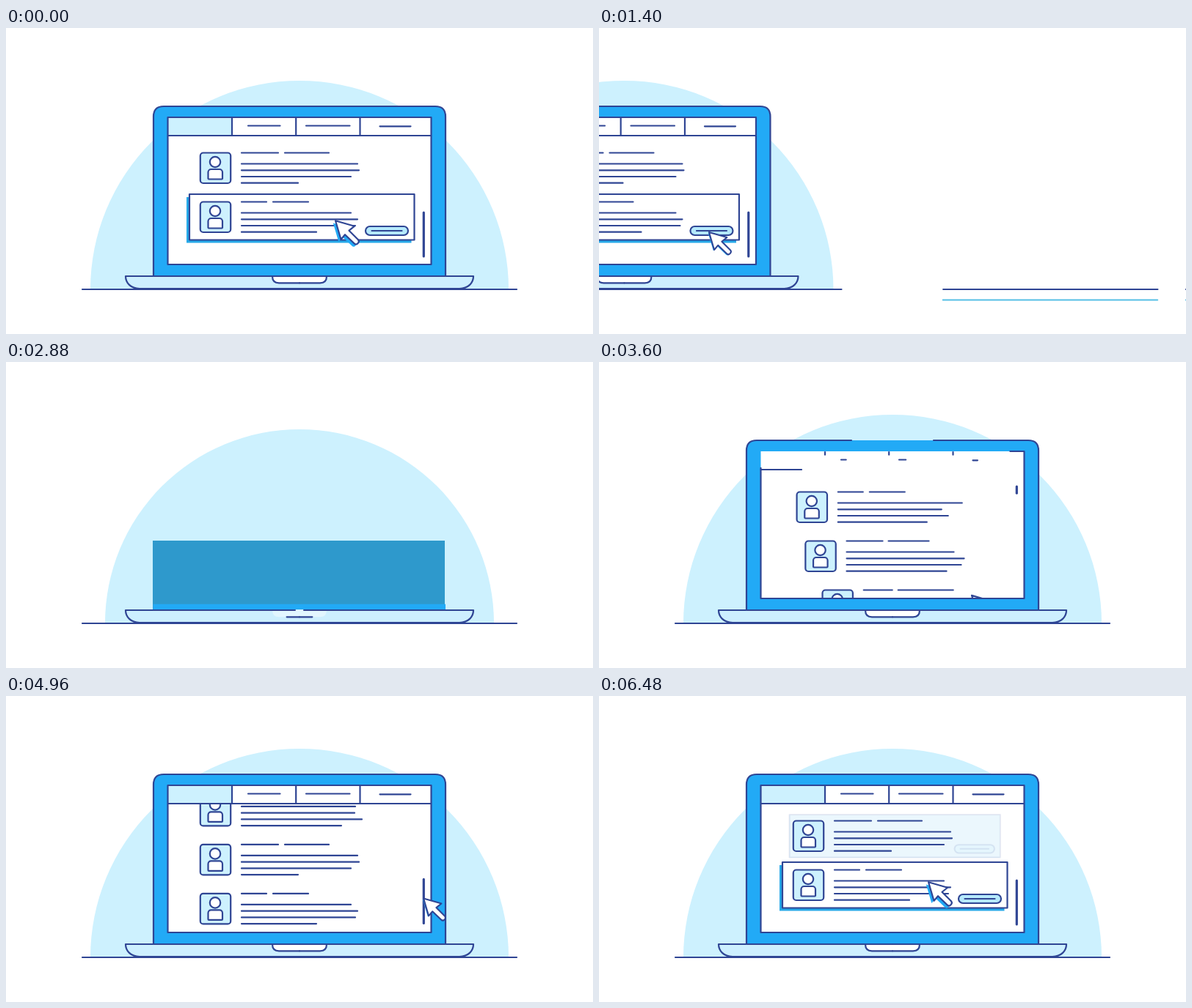
These frames come from a looping animation (800 px wide and 418 px high, 6.52 s). An HTML page with a canvas:

```html
<!DOCTYPE html>
<html lang="en">
<head>
<meta charset="utf-8">
<title>Laptop list</title>
<style>
html, body { margin: 0; width: 100%; height: 100%; overflow: hidden; background: #fff; }
canvas { display: block; }
</style>
</head>
<body>
<canvas id="stage" width="800" height="418"></canvas>
<script>
const LOOP = 6520;
const NAVY = '#2f4594', BLUE = '#22aaf6', LIGHT = '#cdf1fe', CYAN = '#55bfe5', DARK = '#2e99cc';
const ctx = document.getElementById('stage').getContext('2d');

const linear = p => p;
const outQuad = p => 1 - (1 - p) ** 2;
const outCubic = p => 1 - (1 - p) ** 3;
const inOutQuad = p => p < .5 ? 2 * p * p : 1 - 2 * (1 - p) ** 2;
const inOutCubic = p => p < .5 ? 4 * p ** 3 : 1 - 4 * (1 - p) ** 3;
const ramp = (t, from, to, ease = linear) => ease(Math.min(1, Math.max(0, (t - from) / (to - from))));
const mix = (a, b, p) => a + (b - a) * p;

function makePath(d) {
  const el = document.createElementNS('http://www.w3.org/2000/svg', 'path');
  el.setAttribute('d', d);
  return { shape: new Path2D(d), length: el.getTotalLength() };
}

const paths = {
  bodyL: makePath('M201 338V121Q201 107 215 107H400'),
  bodyR: makePath('M599 338V121Q599 107 585 107H400'),
  screenL: makePath('M421 323H220.5V122H379'),
  screenR: makePath('M421 323H579.5V122H379'),
  baseL: makePath('M400 356H182C170 356 163 348 163 339H400'),
  baseR: makePath('M400 356H618C630 356 637 348 637 339H400'),
  notchL: makePath('M400 348.3H372Q363 348.3 363 339'),
  notchR: makePath('M400 348.3H428Q437 348.3 437 339'),
  navy: makePath('M800 357H240C217 357 204.5 340 204.5 316L205.5 240C205.5 180 175 140 130 140C90 140 60 160 45 190'),
  cyan: makePath('M800 371.5H230C205 371.5 193 353 193 330V210C193 172 170 152 133 152C60 152 14 190 14 240')
};
const baseShape = new Path2D('M163 339H637C637 348 630 356 618 356H182C170 356 163 348 163 339Z');
const notchShape = new Path2D('M363 339H437Q437 348.3 428 348.3H372Q363 348.3 363 339Z');
const arrowShape = new Path2D('M0 0L26 7.5L18.5 13.5L31 26Q33 28.5 30.5 31Q28 33.5 25.5 31L13 19L7.5 25.5Z');

// Each card: the two heading spans, then the right ends of four lines.
const cards = [
  [57, 91, 100, 148, 226, 198, 207, 178],
  [57, 106, 114, 169, 203, 217, 213, 193],
  [57, 96, 104, 179, 210, 200, 214, 180],
  [57, 100, 109, 160, 212, 211, 221, 193],
  [57, 107, 116, 176, 215, 217, 206, 134],
  [57, 91, 100, 148, 206, 215, 212, 159]
];

// Start, end, target x, target y, easing.
const cursorStart = [502, 331];
const cursorMoves = [
  [3440, 4200, 569, 196, inOutQuad],
  [4380, 5080, 569, 278, inOutCubic],
  [5300, 5850, 449, 195, inOutCubic],
  [6309, 6698, 449, 281, outQuad],
  [6740, 7220, 515.5, 279, inOutCubic]
];

// Time, tail and head as distance along the path.
const trails = {
  navy: [[960, 121, 121], [1040, 41, 121], [1400, 38, 330], [1840, 280, 707], [2280, 1000, 1000]],
  cyan: [[960, 60, 60], [1040, 50, 102], [1400, 38, 330], [1840, 413, 870], [2280, 1100, 1100]]
};

function stroke(color = NAVY, width = 2.2) {
  ctx.strokeStyle = color;
  ctx.lineWidth = width;
}

function line(x1, y1, x2, y2, width = 2.2) {
  stroke(NAVY, width);
  ctx.beginPath();
  ctx.moveTo(x1, y1);
  ctx.lineTo(x2, y2);
  ctx.stroke();
}

function box(x, y, w, h, r, fill, outlined = true) {
  ctx.beginPath();
  ctx.roundRect(x, y, w, h, r);
  if (fill) {
    ctx.fillStyle = fill;
    ctx.fill();
  }
  if (outlined) {
    stroke();
    ctx.stroke();
  }
}

function segment(path, from, to, color = NAVY) {
  to = Math.min(to, path.length);
  if (to - from < .5) return;
  stroke(color);
  ctx.setLineDash([0, from, to - from, path.length + 10]);
  ctx.stroke(path.shape);
  ctx.setLineDash([]);
}

function pair(name, p) {
  for (const side of 'LR') {
    const path = paths[name + side];
    segment(path, 0, path.length * p);
  }
}

function clip(x, y, w, h) {
  ctx.beginPath();
  ctx.rect(x, y, w, h);
  ctx.clip();
}

function trailAt(keys, t) {
  const i = keys.findIndex(k => k[0] > t);
  if (i < 1) return null;
  const a = keys[i - 1], b = keys[i];
  const p = ramp(t, a[0], b[0]);
  return [mix(a[1], b[1], p), mix(a[2], b[2], p)];
}

function drawTrails(t) {
  for (const name of ['cyan', 'navy']) {
    const span = trailAt(trails[name], t);
    if (!span) continue;
    const [tail, head] = span;
    segment(paths[name], tail, head, name === 'cyan' ? CYAN : NAVY);
    if (name === 'navy') {
      const tint = 51 * (1 - ramp(t, 1040, 1400));
      segment(paths.navy, tail, Math.min(head, tail + tint), CYAN);
    }
  }
}

function drawCard(x, y, spec) {
  box(x + .8, y + .5, 41.4, 41.5, 4, LIGHT);
  ctx.beginPath();
  ctx.arc(x + 21, y + 13, 7.2, 0, Math.PI * 2);
  ctx.fillStyle = '#fff';
  ctx.fill();
  stroke();
  ctx.stroke();
  box(x + 11.5, y + 23, 19.5, 13.5, [4, 4, 1, 1], '#fff');
  line(x + spec[0], y + .5, x + spec[1], y + .5);
  line(x + spec[2], y + .5, x + spec[3], y + .5);
  [15.5, 24.3, 33, 41.7].forEach((dy, i) => line(x + 57, y + dy, x + spec[4 + i], y + dy));
}

function drawHover(y, show, press) {
  if (show <= 0) return;
  ctx.save();
  ctx.globalAlpha = show;
  ctx.translate(403, y + 21);
  ctx.scale(mix(.93, 1, show), mix(.93, 1, show));
  ctx.translate(-403, -y - 21);
  const shift = 4 * show;
  box(250 - shift, y - 10 + shift, 306.5, 62.5, 0, '#27a9e8', false);
  box(250, y - 10, 306.5, 62.5, 0, '#fff');
  ctx.translate(519, y + 40);
  ctx.scale(1 - .1 * press, 1 - .04 * press);
  box(-29, -6, 58, 12, 6, '#b5e9fc');
  line(-20.5, 0, 20.5, 0);
  ctx.restore();
}

function drawContent(u) {
  const scroll = 275 * ramp(u, 4426, 5200, inOutCubic);
  const grow = ramp(u, 3540, 3760, inOutQuad);
  const press = ramp(u, 7460, 7540) - ramp(u, 7580, 7680);
  const top = 177 - scroll;

  ctx.save();
  clip(221, u < 3700 ? 122 : 148, 358, u < 3700 ? 200 : 174);
  drawHover(top + 4 * 67, ramp(u, 5600, 5800, outCubic) - ramp(u, 6320, 6500), 0);
  drawHover(top + 5 * 67, ramp(u, 6280, 6460, outCubic), press);
  cards.forEach((spec, i) => {
    const start = 3369 + 40 * i;
    const dx = 300 * (1 - ramp(u, start, start + 310, outCubic));
    if (u > start) drawCard(264 + dx, top + 67 * i, spec);
  });
  ctx.restore();

  if (grow > 0) {
    ctx.globalAlpha = ramp(u, 3640, 3840);
    box(221, 122, 87, 25, 0, LIGHT, false);
    ctx.globalAlpha = 1;
    line(221, 147, 221 + 358 * grow, 147);
    for (const x of [308, 395.2, 482.5]) line(x, 123, x, 123 + 24 * grow);
    for (const [a, b, y] of [[330, 373.5, 133.5], [409, 468.5, 133.5], [509.5, 551.5, 134.3]])
      line(a, y, mix(a, b, grow), y);
    const barY = 170 + 82 * ramp(u, 4380, 5080, inOutCubic);
    line(569.3, barY, 569.3, barY + 60 * grow, 3.2);
  }
}

function drawCursor(u) {
  if (u < 3440) return;
  let [x, y] = cursorStart;
  for (const [from, to, tx, ty, ease] of cursorMoves) {
    const p = ramp(u, from, to, ease);
    x = mix(x, tx, p);
    y = mix(y, ty, p);
  }
  const down = ramp(u, 4220, 4340) - ramp(u, 5100, 5220) + ramp(u, 7440, 7520);
  ctx.save();
  if (u < 3760) clip(221, 122, 358, 200);
  ctx.translate(x, y);
  const size = 1 - .06 * down;
  ctx.scale(size, size);
  const shift = 3.2 * (1 - .6 * down);
  ctx.save();
  ctx.translate(-shift, shift);
  ctx.fillStyle = BLUE;
  ctx.fill(arrowShape);
  ctx.restore();
  ctx.fillStyle = '#fff';
  ctx.fill(arrowShape);
  stroke();
  ctx.stroke(arrowShape);
  ctx.restore();
}

function drawLaptop(u) {
  const dark = 231 * ramp(u, 2752, 3038, inOutQuad);
  const bright = 231 * ramp(u, 2845, 3131, inOutQuad);
  const corner = 14 * ramp(u, 3131, 3260);
  if (u < 3131) box(200, 338 - dark, 398, dark, 0, DARK, false);
  if (bright > 0) box(200.5, 338 - bright, 398.5, bright, [corner, corner, 0, 0], BLUE, false);
  const white = 201 * ramp(u, 3120, 3400, inOutQuad);
  if (white > 0) {
    box(220.5, 323 - white, 359, white, 0, '#fff', false);
    drawContent(u);
  }
  pair('screen', ramp(u, 3340, 3726));
  pair('body', ramp(u, 3240, 3656));

  ctx.globalAlpha = ramp(u, 2560, 2780);
  ctx.fillStyle = '#cdefff';
  ctx.fill(baseShape);
  ctx.globalAlpha = ramp(u, 2800, 3000);
  ctx.fillStyle = '#fff';
  ctx.fill(notchShape);
  ctx.globalAlpha = 1;
  pair('base', ramp(u, 2500, 2886));
  pair('notch', ramp(u, 2800, 3000));
}

function drawScene(u) {
  const radius = 285 * ramp(u, 2190, 3366, outCubic);
  if (radius > 0) {
    ctx.beginPath();
    ctx.arc(400, 357, radius, Math.PI, 0);
    ctx.fillStyle = LIGHT;
    ctx.fill();
  }
  drawLaptop(u);
  const half = 296 * ramp(u, 2150, 2720, outCubic);
  if (half > 0) line(400 - half, 357, 400 + half, 357);
  drawCursor(u);
}

function draw(t) {
  // The exit continues the previous pass, so its clock runs past the loop.
  const u = t < 1700 ? t + LOOP : t;
  ctx.fillStyle = '#fff';
  ctx.fillRect(0, 0, 800, 418);
  ctx.lineCap = 'round';
  ctx.lineJoin = 'round';
  drawTrails(t);
  ctx.save();
  ctx.translate(-1060 * ramp(u, 7360, 8160, p => p ** 3), 0);
  drawScene(u);
  ctx.restore();
}

const begin = performance.now();
function tick() {
  draw((performance.now() - begin) % LOOP);
  requestAnimationFrame(tick);
}
tick();
</script>
</body>
</html>
```
